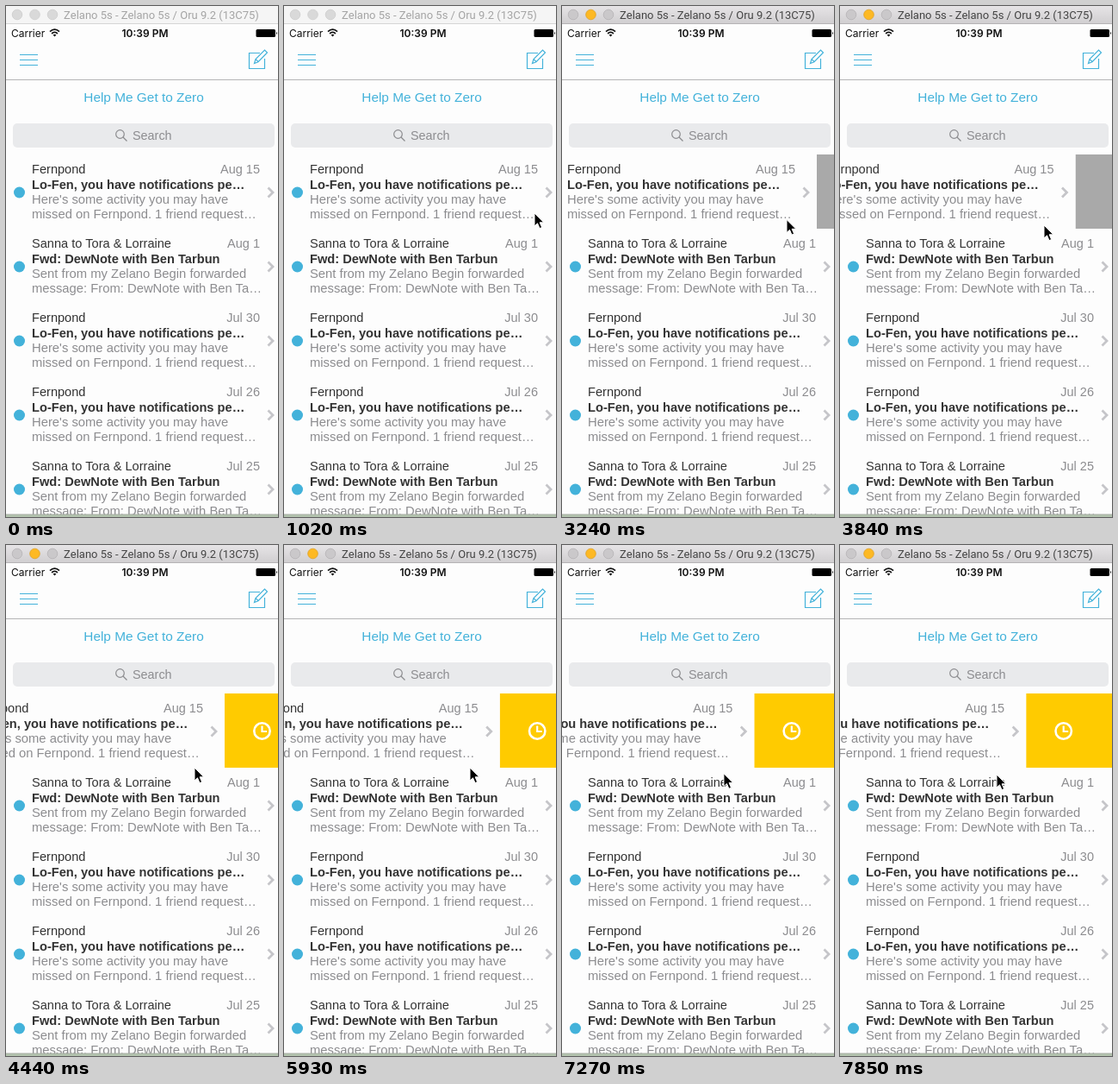
Animation of 316x592 px, one loop 8 s. Source, as an HTML page:

```html
<!DOCTYPE html>
<html lang="en">
<head>
<meta charset="utf-8">
<title>Inbox swipe</title>
<style>
  html, body { margin: 0; width: 100%; height: 100%; overflow: hidden; background: #fdfdfd; }
  svg { display: block; width: 316px; height: 592px; }
  text { font-family: "Liberation Sans", Arial, sans-serif; font-size: 14.8px; fill: #8c8c8f; white-space: pre; }
  .title { font: 13px Roboto, sans-serif; text-anchor: middle; }
  .status { font: 12px Inter, sans-serif; fill: #111; }
  .clock { font-weight: 600; text-anchor: middle; }
  .link { font-size: 15.4px; fill: #43b2da; text-anchor: middle; }
  .search { font-size: 14.4px; }
  .from { font-size: 14.6px; fill: #333; }
  .subject { font-size: 14.65px; font-weight: bold; fill: #333; }
  .date { font-size: 14.5px; text-anchor: end; }
  .blue { fill: none; stroke: #43b2da; stroke-width: 1.2; }
</style>
</head>
<body>
<svg viewBox="0 0 316 592">
  <defs>
    <linearGradient id="bar" x2="0" y2="1">
      <stop stop-color="#e6e4e6"/><stop offset="1" stop-color="#d0ced0"/>
    </linearGradient>
  </defs>
  <rect width="316" height="592" fill="#fdfdfd"/>

  <g id="list"></g>

  <g id="header">
    <path d="M0 85.5H316" stroke="#b4b4b6"/>
    <path class="blue" d="M16 56.5H37M16 62.5H37M16 68.5H37"/>
    <path class="blue" d="M295 54.5H282.5V72.5H300.5V61"/>
    <path class="blue" d="M288.5 66.5L290 61.5L300.5 51L303.5 54L293 64.7ZM290 61.5L293 64.7"/>
    <text class="link" x="160" y="110.5">Help Me Get to Zero</text>
    <rect x="8" y="136" width="304" height="28" rx="5" fill="#e9eaec"/>
    <g fill="none" stroke="#8c8c8f" stroke-width="1.2">
      <circle cx="132.5" cy="148.5" r="4.8"/><path d="M136 152L140.5 156.5"/>
    </g>
    <text class="search" x="147" y="155">Search</text>
  </g>

  <g id="statusBar">
    <text class="status" x="6" y="35.5">Carrier</text>
    <g fill="none" stroke="#111" stroke-width="1.7">
      <path d="M51 29.6Q56.5 24.6 62 29.6M53.1 32Q56.5 28.9 59.9 32"/>
    </g>
    <path d="M54.6 33.5Q56.5 32 58.4 33.5L56.5 35.6Z" fill="#111"/>
    <text class="status clock" x="161.5" y="35.5">10:39 PM</text>
    <rect x="290.5" y="27" width="22.5" height="9" rx="1.5" fill="#000"/>
    <path d="M314 30Q316 31.5 314 33Z" fill="#000"/>
  </g>

  <g id="titleBar">
    <rect id="barFill" width="316" height="21"/>
    <path id="barEdge" d="M0 20.5H316"/>
    <g id="lights" stroke-width=".8">
      <circle cx="13" cy="10" r="5.8"/><circle cx="33.5" cy="10" r="5.8"/><circle cx="54" cy="10" r="5.8"/>
    </g>
    <text class="title" id="title" x="180.5" y="15">Zelano 5s - Zelano 5s / Oru 9.2 (13C75)</text>
  </g>

  <rect y="589" width="316" height="3" fill="#b3c3ae"/>
  <path d="M0 589H316" stroke="#9fa59d" stroke-width=".8"/>

  <path id="cursor" d="M0 0V15L3.5 11.8L6 17.6L8.6 16.5L6.1 10.8H10.8Z"
        fill="#000" stroke="#fff" stroke-width="1" stroke-linejoin="round"/>
</svg>

<script>
const LOOP = 8000;
const ROW_TOP = 172, ROW_HEIGHT = 86, SCREEN_WIDTH = 320;
const SNOOZE_AT = 64;
const ACTIVE_AT = 1320;
const $ = id => document.getElementById(id);

const notice = {
  from: 'Fernpond',
  subject: 'Lo-Fen, you have notifications pe…',
  body: ["Here's some activity you may have", 'missed on Fernpond. 1 friend request…']
};
const forward = {
  from: 'Sanna to Tora & Lorraine',
  subject: 'Fwd: DewNote with Ben Tarbun',
  body: ['Sent from my Zelano Begin forwarded', 'message: From: DewNote with Ben Ta…']
};
const mails = [[notice, 'Aug 15'], [forward, 'Aug 1'], [notice, 'Jul 30'], [notice, 'Jul 26'], [forward, 'Jul 25']];

const escapeText = s => s.replace(/&/g, '&amp;');
const text = (cls, x, y, s) => `<text class="${cls}" x="${x}" y="${y}">${escapeText(s)}</text>`;

function mailRow([mail, date], i) {
  const y = ROW_TOP + i * ROW_HEIGHT;
  return `<g transform="translate(0 ${y})">
    ${i ? '' : `<rect id="panel" width="320" height="86"/>
      <g id="snooze" fill="none" stroke="#fff" stroke-width="2.6">
        <circle cy="43.5" r="9.2"/><path d="M0 37.5V44H5.5" stroke-width="2.2"/>
      </g>`}
    <g ${i ? '' : 'id="swipeRow"'}>
      <rect width="320" height="86" fill="#fdfdfd"/>
      <circle cx="15.5" cy="44" r="6.5" fill="#43b2da"/>
      ${text('from', 30, 22, mail.from)}
      ${text('date', 295, 22, date)}
      ${text('subject', 30, 39.5, mail.subject)}
      ${text('body', 30, 57, mail.body[0])}
      ${text('body', 30, 73.5, mail.body[1])}
      <path d="M304.5 38.5L310 44L304.5 49.5" fill="none" stroke="#c5c5c9" stroke-width="2.8"/>
    </g>
    <path d="M0 86.5H320" stroke="#d2d2d4"/>
  </g>`;
}
$('list').innerHTML = mails.map(mailRow).join('');

// Moments at which the screen refreshes.
const ticks = [440, 590, 740, 890, 1020, 1320, 1620, 2070, 2220, 2360,
  2660, 2810, 2960, 3090, 3240, 3390, 3540, 3690, 3840, 3990, 4140, 4290, 4440,
  5930, 6080, 6230, 6380, 6530, 6670, 6820, 6970, 7120, 7270, 7410, 7560, 7710, 7850];

// time, cursor x, cursor y, row offset
const path = [
  [440, 267, 300, 0],
  [1020, 291, 240, 0],
  [1320, 286, 239, 0],
  [1620, 291, 239, 0],
  [2070, 295, 239, 0],
  [2360, 294.5, 238.5, 0],
  [2660, 285, 240, 2],
  [3240, 261, 247.5, 24],
  [3840, 237, 254, 46.5],
  [4440, 219, 258, 66],
  [5930, 216, 258, 69.3],
  [6820, 195.5, 262.5, 88.5],
  [6970, 191, 264, 93],
  [7850, 182, 266, 103.8]
];

function poseAt(time) {
  const next = path.findIndex(key => key[0] > time);
  if (next < 0) return path[path.length - 1].slice(1);
  const a = path[next - 1], b = path[next];
  const k = (time - a[0]) / (b[0] - a[0]);
  return a.slice(1).map((v, i) => v + (b[i + 1] - v) * k);
}

const move = (id, x, y) => $(id).setAttribute('transform', `translate(${x} ${y})`);
const paint = (el, fill, stroke) => {
  el.setAttribute('fill', fill);
  el.setAttribute('stroke', stroke || 'none');
};

function drawTitleBar(active) {
  paint($('barFill'), active ? 'url(#bar)' : '#f5f5f5');
  paint($('barEdge'), 'none', active ? '#b5b3b5' : '#d5d5d5');
  $('title').style.fill = active ? '#444' : '#a4a4a4';
  [...$('lights').children].forEach((light, i) => {
    if (active && i === 1) paint(light, '#fdb924', '#dfa023');
    else paint(light, active ? '#cac8ca' : '#d9d9d9', active ? '#b5b3b5' : '#cdcdcd');
  });
}

function draw(time) {
  const tick = ticks.filter(t => t <= time).pop() || 0;
  const visible = tick > 0;
  const [x, y, offset] = visible ? poseAt(tick) : [0, 0, 0];
  const armed = offset >= SNOOZE_AT;
  const edge = SCREEN_WIDTH - offset;

  drawTitleBar(tick >= ACTIVE_AT);
  $('cursor').style.display = visible ? '' : 'none';
  move('cursor', x, y);
  move('swipeRow', -offset, 0);
  move('panel', edge, 0);
  paint($('panel'), armed ? '#ffcb00' : '#a9a9a9');
  move('snooze', edge + 43.5, 0);
  $('snooze').style.display = armed ? '' : 'none';
}

const start = performance.now();
function loop() {
  draw((performance.now() - start) % LOOP);
  requestAnimationFrame(loop);
}
loop();
</script>
</body>
</html>
```
